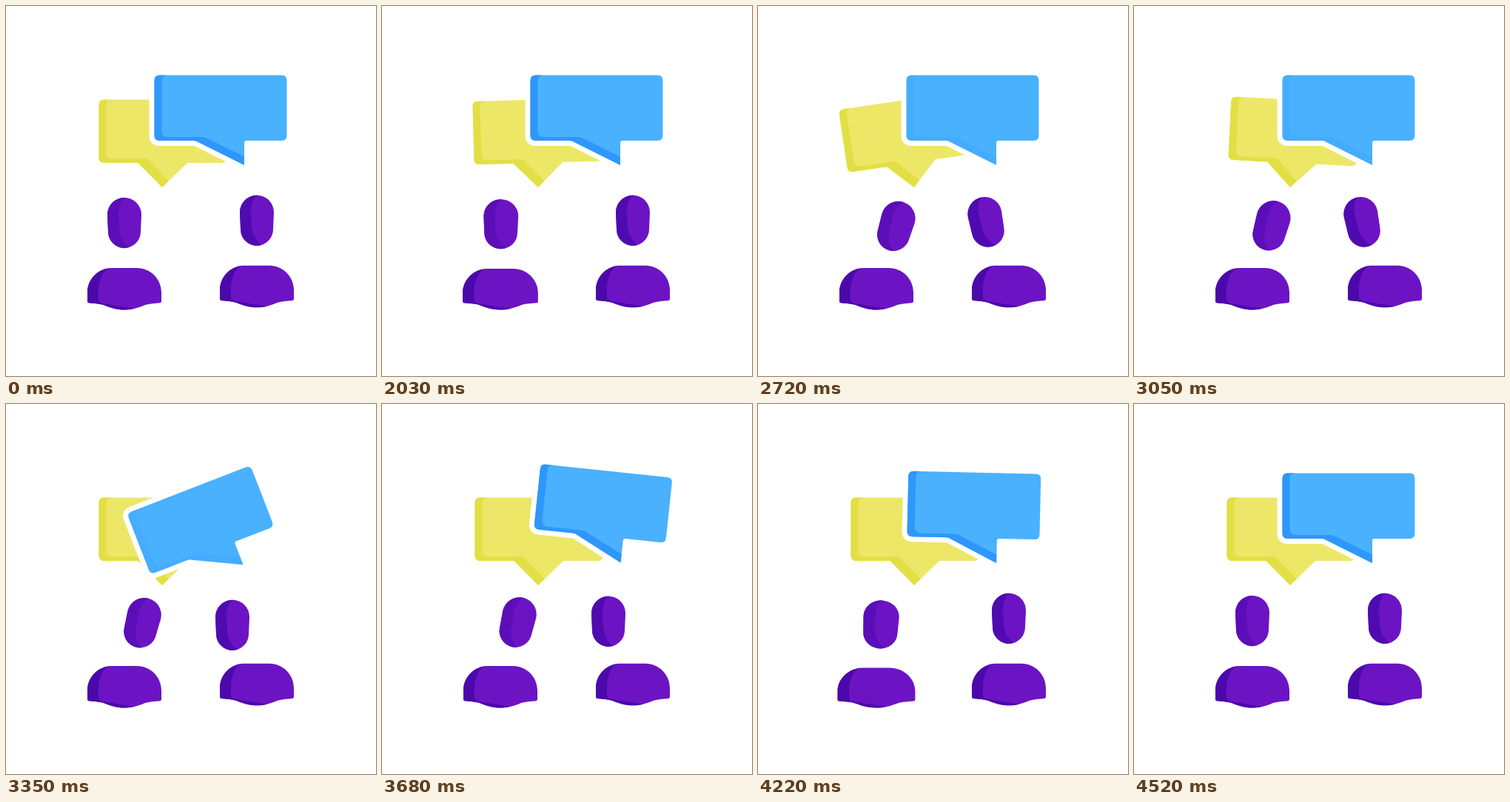
Animation, 500 px wide and 500 px high, one loop 4.55 s. Source, as an HTML page:

```html
<!DOCTYPE html>
<html lang="en">
<head>
<meta charset="utf-8">
<title>Conversation</title>
<style>
  html, body { margin: 0; width: 100%; height: 100%; overflow: hidden; background: #fff; }
  svg { display: block; width: 100%; height: 100%; }
</style>
</head>
<body>
<svg viewBox="0 0 500 500">
  <defs>
    <g id="body">
      <path fill="#6c14c4" d="M110 387C110 369 125 354 143 354H177C195 354 210 369 210 387V399Q210 401 208 401.2C200 402 194 402 188 404C178 408 171 410.5 160 410.5C149 410.5 142 408 132 404C126 402 120 402 112 401.2Q110 401 110 399Z"/>
      <path fill="#4b09ac" d="M143 354C125 354 110 369 110 387V399Q110 401 112 401.2C120 402 126 402 132 404C142 408 149 410.5 160 410.5C165 410.5 169 410 174 408.6C158 407 146 404 131 402Q125 401 125 396V387C125 371 131 354 143 354Z"/>
    </g>
    <path id="skull" fill="#6c14c4" d="M-23 -11A23 23 0 0 1 23 -11L22 12A22 22 0 0 1 -22 12Z"/>
    <path id="shade" d="M1 -34A23 23 0 0 0 -23 -11L-22 12A22 22 0 0 0 7 33C0 29 -6 20 -7 8L-8 -11C-8 -22 -5 -30 1 -34Z"/>
  </defs>

  <g id="yellow">
    <path fill="#ede767" d="M132.500 126.500H292Q299 126.500 299 133.500V205Q299 212 292 212H245L211 245L178.500 212H132.500Q125.500 212 125.500 205V133.500Q125.500 126.500 132.500 126.500Z"/>
    <path fill="#e2df45" d="M142.500 126.500H132.500Q125.500 126.500 125.500 133.500V205Q125.500 212 132.500 212H178.500L211 245L219.500 236.500L191 206.500H144Q135.500 206.500 135.500 198V133.500Q135.500 126.500 142.500 126.500Z"/>
  </g>

  <g id="blue">
    <path fill="#4ab1ff" stroke="#fff" stroke-width="14" stroke-linejoin="round" paint-order="stroke" d="M207.500 93.500H372.500Q379.500 93.500 379.500 100.500V175Q379.500 182 372.500 182H325Q322 182 322 185V215L258 183Q256 182 254 182H207.500Q200.500 182 200.500 175V100.500Q200.500 93.500 207.500 93.500Z"/>
    <path id="strip" fill="#2f97fb" d="M217.500 93.500H207.500Q200.500 93.500 200.500 100.500V175Q200.500 182 207.500 182H254Q256 182 258 183L322 215V203.500L270 178Q268 177 266 177H219Q210.500 177 210.500 168.500V100.500Q210.500 93.500 217.500 93.500Z"/>
  </g>

  <g>
    <use id="bodyL" href="#body"/>
    <g id="headL"><use href="#skull"/><use href="#shade" fill="#5b0eb8"/></g>
  </g>
  <g transform="translate(179 -3.2)">
    <use id="bodyR" href="#body"/>
    <g id="headR"><use href="#skull"/><use href="#shade" fill="#500bb0"/></g>
  </g>
</svg>
<script>
const LOOP = 4550, START = 2030, STEP = 30;
const MOVE = 300;    // a head leaning in or back
const SWING = 255;   // one half swing of a bubble
const $ = id => document.getElementById(id);
const clamp = p => Math.min(1, Math.max(0, p));

// Eased progress from 0 to 1
function ramp(t, from, span) {
  const p = clamp((t - from) / span);
  return p * p * (3 - 2 * p);
}

// Rises from 0 to 1 and falls back
const bump = (t, from, span) => Math.sin(Math.PI * clamp((t - from) / span));

// Side-to-side peaks that shrink by the same angle each time
const peak = k => k > 0 ? (-1) ** k * Math.max(0, 23.2 - 6.7 * (k - 1)) : 0;

function bubble(id, from, x, y, t) {
  const k = Math.floor((t - from) / SWING);
  const angle = peak(k) + (peak(k + 1) - peak(k)) * ramp(t, from + k * SWING, SWING);
  $(id).setAttribute("transform", `rotate(${angle} ${x} ${y})`);
}

// lean and drift hold x, y and turn
const left = {
  out: 2000, back: 4020, lean: [26.5, 4.5, 16.5],
  drift: [-3.2, -2.5, -3.5], driftFrom: 2720, driftSpan: 960, nod: 0
};
const right = {
  out: 2150, back: 3810, lean: [-30.5, 2, -11],
  drift: [-2.5, 2, 11], driftFrom: 3080, driftSpan: 270, nod: 5
};

function person(side, p, t) {
  const lean = ramp(t, p.out, MOVE) - ramp(t, p.back, MOVE);
  const drift = ramp(t, p.driftFrom, p.driftSpan);
  const [x, y, turn] = p.lean.map((v, i) => (v + p.drift[i] * drift) * lean);
  const nod = p.nod * bump(t, 3140, 420);
  const squash = 2.8 * (bump(t, p.out, MOVE) + bump(t, p.back, MOVE));
  const scale = `scale(${1 + squash * .02} ${1 - squash * .018})`;
  $("body" + side).setAttribute("transform", `translate(160 410.5) ${scale} translate(-160 -410.5)`);
  $("head" + side).setAttribute("transform",
    `translate(${160 + x} ${293 + y + nod + squash * 1.8}) rotate(${turn}) ${scale}`);
}

function draw(ms) {
  const now = ms % LOOP;
  const t = now < START ? 0 : START + Math.floor((now - START) / STEP) * STEP;
  bubble("yellow", 1990, 211, 245, t);
  bubble("blue", 3060, 327, 220, t);
  $("strip").setAttribute("opacity", 1 - .82 * (ramp(t, 2000, MOVE) - ramp(t, 3350, MOVE)));
  person("L", left, t);
  person("R", right, t);
}

const begin = performance.now();
function tick() {
  draw(performance.now() - begin);
  requestAnimationFrame(tick);
}
tick();
</script>
</body>
</html>
```
